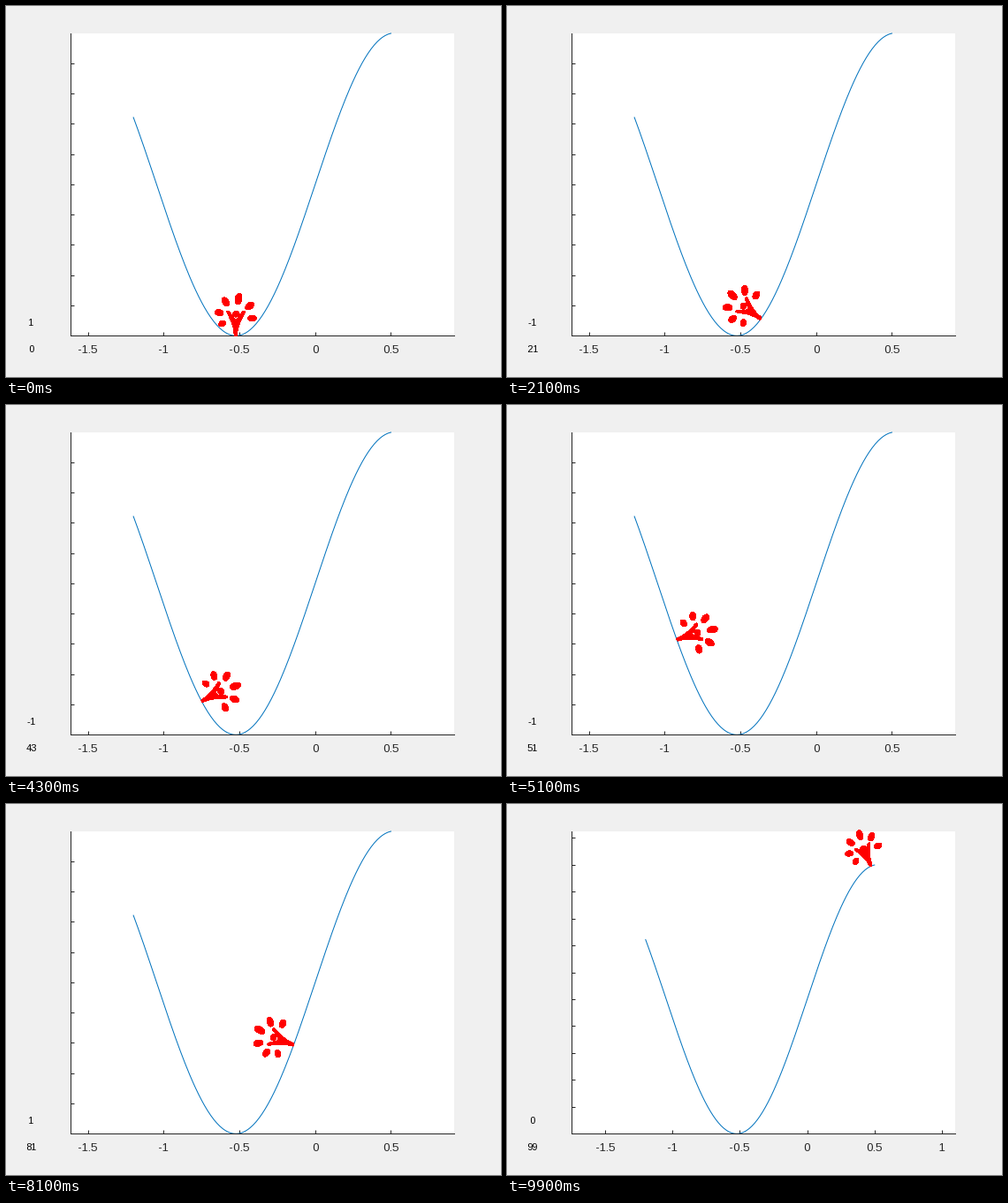
These frames come from a looping animation (560 px wide and 420 px high, 10 s). A matplotlib script:

```python
import numpy as np
import matplotlib.pyplot as plt
from matplotlib.animation import FuncAnimation
from matplotlib.patches import Polygon
from matplotlib.ticker import FuncFormatter, MultipleLocator

W, H, DPI = 560, 420, 80
PX = 72 / DPI          # points per pixel
UNIT = 171.2           # pixels per data unit in the normal view
FRAMES = 100
INK = "#262626"
EDGE = 2.2             # outline width of the paw

START, SPEED = -0.525, 0.001
PUSH, GRAVITY = 0.00103, 0.0025

plt.rcParams["font.family"] = "Liberation Sans"
plt.rcParams["text.hinting_factor"] = 1


def action(n):
    if n == FRAMES - 1:
        return 0
    return -1 if 16 <= n < 52 else 1


def ride():
    """Car in a valley, pushed left or right at every step."""
    x, v = START, SPEED
    path = []
    for n in range(FRAMES):
        path.append(x)
        v += PUSH * action(n) - GRAVITY * np.cos(3 * x)
        x += v
    return path


def turn(points, angle):
    c, s = np.cos(angle), np.sin(angle)
    return points @ np.array([[c, s], [-s, c]])


def oval(x, y, angle, length, width):
    t = np.linspace(0, 2 * np.pi, 24, endpoint=False)
    ring = np.column_stack([(length - EDGE) / 2 * np.cos(t),
                            (width - EDGE) / 2 * np.sin(t)])
    return turn(ring, angle) + (x, y)


def pad(k):
    """Pad k of the fan, shrinking away from the top one."""
    angle = np.radians(81 + 42 * k)
    radius = 21 - 0.5 * k * k
    return oval(-0.6 + radius * np.cos(angle), 21 + radius * np.sin(angle),
                angle, 12.3 - 1.4 * abs(k), 7.3 - 0.3 * abs(k))


def paw_shapes():
    side = np.array([(0.5, 1), (1.3, 8), (3.8, 16), (9.2, 27), (8.4, 27), (3, 19)])
    stem = np.vstack([side, (0, 17.5), side[::-1] * (-1, 1)])
    heel = oval(0.2, 24.5, 0, 7.5, 6.5)
    return [p / UNIT for p in (stem, heel, *map(pad, range(-2, 4)))]


PATH = ride()
SHAPES = paw_shapes()
BOX = np.array([0.775 * W, 0.815 * H])

fig = plt.figure(figsize=(W / DPI, H / DPI), dpi=DPI, facecolor="#f0f0f0")
ax = fig.add_axes([0.13, 46.7 / H, 0.775, 0.815])
for name in ("top", "right"):
    ax.spines[name].set_visible(False)
for name in ("left", "bottom"):
    ax.spines[name].set(color=INK, linewidth=PX)
ax.xaxis.set_major_locator(MultipleLocator(0.5))
ax.yaxis.set_major_locator(MultipleLocator(0.2))
ax.xaxis.set_major_formatter(FuncFormatter(lambda v, _: f"{round(v, 1) + 0:g}"))
ax.tick_params(direction="in", length=4 * PX, width=PX, color=INK,
               labelcolor=INK, labelsize=13.33 * PX, pad=10.6 * PX)
ax.tick_params(axis="y", labelleft=False)

hill_x = np.linspace(-1.2, 0.5, 171)
hill = np.column_stack([hill_x, np.sin(3 * hill_x)])
ax.plot(*hill.T, color="#0072bd", linewidth=PX, clip_on=False)

paw = [ax.add_patch(Polygon(s, facecolor="red", edgecolor="red",
                            linewidth=EDGE * PX, joinstyle="round",
                            antialiased=False, clip_on=False, zorder=5))
       for s in SHAPES]


def readout(baseline):
    return fig.text(28.3 / W, 1 - baseline / H, "", ha="center",
                    va="baseline", fontsize=11 * PX, color="black")


action_text, step_text = readout(362), readout(392)


def fit_view(points):
    """Equal scales, just large enough for all points."""
    low, high = points.min(axis=0), points.max(axis=0)
    half = BOX / min(BOX / (high - low)) / 2
    mid = (low + high) / 2
    ax.set_xlim(mid[0] - half[0], mid[0] + half[0])
    ax.set_ylim(mid[1] - half[1], mid[1] + half[1])


def draw(n):
    x = PATH[n]
    tilt = np.arctan(3 * np.cos(3 * x))
    placed = [turn(s, tilt) + (x, np.sin(3 * x)) for s in SHAPES]
    for patch, points in zip(paw, placed):
        patch.set_xy(points)
    fit_view(np.vstack([hill] + placed))
    action_text.set_text(str(action(n)))
    step_text.set_text(str(n))
    return [*paw, action_text, step_text]


anim = FuncAnimation(fig, draw, frames=FRAMES, interval=100,
                     repeat=True, repeat_delay=0, blit=False)
plt.show()
```
